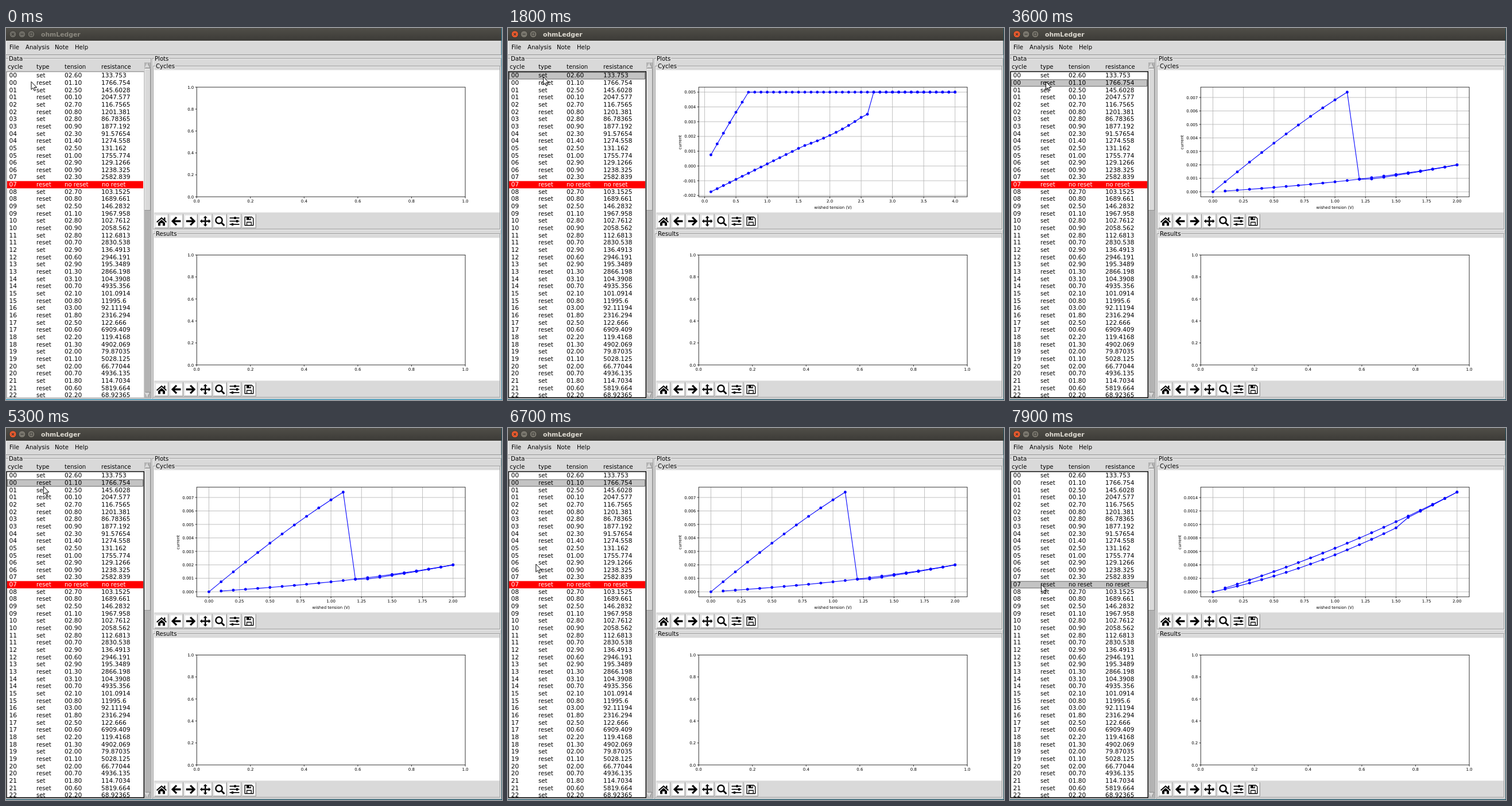
An HTML page with a canvas that plays this animation: 864x648 px, repeating every 8000 ms.

```html
<!DOCTYPE html>
<html lang="en">
<head>
<meta charset="utf-8">
<title>ohmLedger</title>
<style>
html, body { margin: 0; width: 100%; height: 100%; overflow: hidden; background: #d9d9d9; }
canvas { display: block; }
</style>
</head>
<body>
<canvas id="stage" width="864" height="648"></canvas>
<script>
const ctx = document.getElementById('stage').getContext('2d');
const LOOP = 8000, TICK = 100;
const FACE = '"DejaVu Sans", sans-serif';
const GREY = '#d9d9d9';
const ROW_TOP = 76.8, ROW_H = 12.656, BAD_ROW = 15;

// Text of the listing: tension and resistance, set and reset in turn.
const rows = `02.60 133.753,01.10 1766.754,02.50 145.6028,00.10 2047.577,02.70 116.7565,00.80 1201.381,
02.80 86.78365,00.90 1877.192,02.30 91.57654,01.40 1274.558,02.50 131.162,01.00 1755.774,
02.90 129.1266,00.90 1238.325,02.30 2582.839,- -,02.70 103.1525,00.80 1689.661,
02.50 146.2832,01.10 1967.958,02.80 102.7612,00.90 2058.562,02.80 112.6813,00.70 2830.538,
02.90 136.4913,00.60 2946.191,02.90 195.3489,01.30 2866.198,03.10 104.3908,00.70 4935.356,
02.10 101.0914,00.80 11995.6,03.00 92.11194,01.80 2316.294,02.50 122.666,00.60 6909.409,
02.20 119.4168,01.30 4902.069,02.00 79.87035,01.10 5028.125,02.00 66.77044,00.70 4936.135,
01.80 114.7034,00.60 5819.664,02.20 68.92365`.split(',').map(r => r.trim().split(' '));

// Currents as functions of voltage, in units of 1e-5.
const poly = (a, b, c = 0) => v => v * (a + v * (b + v * c));
const sweep = (from, to, current) =>
  Array.from({ length: Math.round((to - from) * 10) + 1 }, (_, i) => {
    const v = from + i / 10;
    return [v, current(v)];
  });

const LIMIT = 500;
const conducting = poly(760, -66);
const insulating = poly(70.1, -14.9, 15.8);
const breaking = v => Math.min(insulating(v), 308 + 210 * (v - 2.4));
const heating = poly(747, -35, -30);
const leaking = poly(58, 11, 5);
const dropped = v => Math.max(93, leaking(v) - 14 * (2 - v));
const failedUp = poly(38.1, 16.8), failedDown = poly(55.4, 9.3);

const setPlot = {
  x: [0.5, 1], y: [100, 3], curves: [
    sweep(0.1, 4, v => Math.min(LIMIT, conducting(v))),
    sweep(0.1, 4, v => v < 2.65 ? breaking(v) : LIMIT)
  ]
};
const resetPlot = {
  x: [0.25, 2], y: [100, 3], curves: [
    sweep(0, 2, v => v < 1.15 ? heating(v) : dropped(v)),
    sweep(0.1, 2, leaking)
  ]
};
const failedPlot = {
  x: [0.25, 2], y: [20, 4], curves: [
    sweep(0, 2, v => v < 1.55 ? failedUp(v) : failedDown(v) - 5 * (2 - v)),
    sweep(0.1, 2, failedDown)
  ]
};
const emptyPlot = { x: [0.2, 1], y: [0.2, 1], curves: [] };

// Pointer tip: time, x, y.
const pointerKeys = [
  [0, 44, 93], [800, 44, 93], [1000, 52, 91], [1100, 52, 91], [1300, 61.5, 84.5],
  [3000, 61.5, 84.5], [3100, 62.5, 93], [5200, 62.5, 93], [5500, 71, 118], [5900, 57.5, 165],
  [6100, 62, 180], [6800, 46.5, 246], [7000, 51.5, 261], [7400, 54.5, 272], [LOOP, 54.5, 272]
];

function pointerAt(t) {
  const i = pointerKeys.findIndex(k => k[0] > t);
  const [t0, x0, y0] = pointerKeys[i - 1], [t1, x1, y1] = pointerKeys[i];
  const u = (t - t0) / (t1 - t0);
  return [x0 + (x1 - x0) * u, y0 + (y1 - y0) * u];
}

function rect(x0, y0, x1, y1, color) {
  ctx.fillStyle = color;
  ctx.fillRect(x0, y0, x1 - x0, y1 - y0);
}

function line(x0, y0, x1, y1, color, width = 1) {
  ctx.strokeStyle = color;
  ctx.lineWidth = width;
  ctx.beginPath();
  ctx.moveTo(x0, y0);
  ctx.lineTo(x1, y1);
  ctx.stroke();
}

function box(x0, y0, x1, y1, color, width = 1) {
  ctx.strokeStyle = color;
  ctx.lineWidth = width;
  ctx.strokeRect(x0, y0, x1 - x0, y1 - y0);
}

function text(s, x, y, { size = 10.125, color = '#000', align = 'left', weight = '' } = {}) {
  ctx.font = `${weight} ${size}px ${FACE}`;
  ctx.textAlign = align;
  ctx.fillStyle = color;
  ctx.fillText(s, x, y);
}

function groove(label, x0, y0, x1, y1, labelX) {
  box(x0 + 1, y0 + 1, x1 + 1, y1 + 1, '#fff', 0.9);
  box(x0, y0, x1, y1, '#8c8c8c', 0.9);
  ctx.font = `10.125px ${FACE}`;
  rect(labelX - 1, y0 - 5, labelX + ctx.measureText(label).width + 1, y0 + 6, GREY);
  text(label, labelX, y0 + 3.6);
}

function raised(x0, y0, x1, y1) {
  rect(x0, y0, x1, y1, '#828282');
  rect(x0, y0, x1 - 0.9, y1 - 0.9, '#fff');
  rect(x0 + 0.9, y0 + 0.9, x1 - 0.9, y1 - 0.9, GREY);
}

function disc(x, y, r, fill, stroke) {
  ctx.beginPath();
  ctx.arc(x, y, r, 0, Math.PI * 2);
  ctx.fillStyle = fill;
  ctx.fill();
  if (!stroke) return;
  ctx.strokeStyle = stroke;
  ctx.lineWidth = 0.8;
  ctx.stroke();
}

function titleBar(active) {
  const shade = ctx.createLinearGradient(0, 0, 0, 22);
  shade.addColorStop(0, '#504e48');
  shade.addColorStop(1, '#3c3b37');
  rect(0, 0, 864, 22.5, shade);
  const ink = '#3a3935';
  [12, 28, 44].forEach((x, i) => {
    const fill = !active ? '#6e6c65' : i ? '#7a776e' : '#ea5a2d';
    disc(x, 10.8, 6, fill, '#35342f');
    if (i === 0) {
      line(x - 2, 8.8, x + 2, 12.8, ink, 1.2);
      line(x - 2, 12.8, x + 2, 8.8, ink, 1.2);
    } else if (i === 1) line(x - 2.5, 10.8, x + 2.5, 10.8, ink, 1.2);
    else box(x - 2.2, 8.6, x + 2.2, 13, ink);
  });
  text('ohmLedger', 61, 14.6, { size: 10.8, weight: 'bold', color: active ? '#dfdbd2' : '#8b887f' });
}

function menuBar() {
  raised(0, 22.5, 863, 47);
  [['File', 6], ['Analysis', 34], ['Note', 85], ['Help', 120]].forEach(([s, x]) => text(s, x, 37.3));
}

function scrollBar() {
  rect(241, 60, 252, 644, '#b3b3b3');
  raised(241.5, 71, 251.5, 318);
  const arrow = (base, tip) => {
    ctx.beginPath();
    ctx.moveTo(242, base);
    ctx.lineTo(246.5, tip);
    ctx.lineTo(251, base);
    ctx.closePath();
    ctx.fillStyle = GREY;
    ctx.fill();
    ctx.strokeStyle = '#858585';
    ctx.lineWidth = 0.9;
    ctx.stroke();
    line(242, base, 246.5, tip, '#fff', 0.9);
  };
  arrow(69.5, 61);
  arrow(634.5, 643);
}

function table(selected, focused) {
  [['cycle', 3], ['type', 53], ['tension', 102], ['resistance', 166]].forEach(([s, x]) => text(s, x, 70.7));
  rect(1, 76, 240, 644, '#fff');
  ctx.save();
  ctx.beginPath();
  ctx.rect(1, 76, 239, 567.5);
  ctx.clip();
  rows.forEach(([tension, resistance], i) => {
    const top = ROW_TOP + i * ROW_H, base = top + 9.5;
    const bad = i === BAD_ROW, picked = i === selected;
    if (bad || picked) rect(1.8, top, 239, top + ROW_H, picked ? '#c3c3c3' : '#f00');
    if (picked) {
      ctx.setLineDash([1, 1]);
      box(2.3, top + 0.5, 238.5, top + ROW_H - 0.5, '#000', 0.9);
      ctx.setLineDash([]);
    }
    const color = bad && !picked ? '#fff' : '#000';
    const digits = { size: 10.6, color };
    text(String(i >> 1).padStart(2, '0'), 5.5, base, digits);
    text(i % 2 ? 'reset' : 'set', 53, base, { color });
    text(bad ? 'no reset' : tension, 102, base, bad ? { color } : digits);
    text(bad ? 'no reset' : resistance, bad ? 167 : 166, base, bad ? { color } : digits);
  });
  ctx.restore();
  if (focused) box(1, 76, 240.3, 643.8, '#000', 1.4);
  else {
    box(1, 76, 240.3, 643.8, '#c8c8c8', 0.8);
    line(0.5, 76, 240.5, 76, '#777', 0.9);
    line(1, 76, 1, 644, '#777', 0.9);
  }
}

const shapes = {
  home: new Path2D('M-9 1L0-7L9 1L7.7 2.4L0-4.3L-7.7 2.4ZM-6 2.7L0-2.6L6 2.7V8H2V3.2H-2V8H-6ZM4-6.5H6.5V-1.5L4-3.7Z'),
  arrow: new Path2D('M-8.5 0L-.5-8L1.8-5.8L-2.4-1.7H8V1.7H-2.4L1.8 5.8L-.5 8Z'),
  chevron: new Path2D('M-1.2-1V-5.7H-3.5L0-9.3L3.5-5.7H1.2V-1Z'),
  disk: new Path2D('M-8-8H5L8-5V8H-8ZM-6.6-6.6V6.6H-4.5V1H4.5V6.6H6.6V-4.4L4.4-6.6H3.5V-2H-4.5V-6.6ZM.5-6.6V-3.4H2.4V-6.6ZM-3.2 2.4V6.6H3.2V2.4Z')
};
const fillShape = name => ctx.fill(shapes[name], 'evenodd');
const icons = [
  () => fillShape('home'),
  () => fillShape('arrow'),
  () => { ctx.scale(-1, 1); fillShape('arrow'); },
  () => {
    ctx.fillRect(-1.2, -1.2, 2.4, 2.4);
    for (let i = 0; i < 4; i++) {
      fillShape('chevron');
      ctx.rotate(Math.PI / 2);
    }
  },
  () => {
    disc(-1.6, -1.6, 5.6, '#fff');
    ctx.lineWidth = 2.4;
    ctx.strokeStyle = '#000';
    ctx.stroke();
    line(2.8, 2.8, 7.8, 7.8, '#000', 3);
  },
  () => [[-5.6, 1], [0, 4.5], [5.6, -3.5]].forEach(([y, knob]) => {
    line(-8.5, y, 8.5, y, '#000', 1.7);
    rect(knob - 1.6, y - 2.1, knob + 1.6, y + 2.1, '#000');
  }),
  () => fillShape('disk')
];

function toolbar(y) {
  icons.forEach((draw, i) => {
    const x = 271 + 25.4 * i;
    raised(x - 12, y - 12.2, x + 12.2, y + 12.2);
    rect(x - 10, y - 10.2, x + 10.2, y + 10.2, '#fff');
    ctx.save();
    ctx.translate(x, y);
    ctx.fillStyle = '#000';
    draw();
    ctx.restore();
  });
}

// Data range widened by five percent on both sides.
function limits(values) {
  if (!values.length) return [0, 1];
  const low = Math.min(...values), high = Math.max(...values), pad = (high - low) / 20;
  return [low - pad, high + pad];
}

function ticks([low, high], step) {
  const list = [];
  for (let k = Math.ceil(low / step); k * step <= high + 1e-9; k++) list.push(k * step);
  return list;
}

function chart({ x: [xStep, xDigits], y: [yStep, yDigits], curves }, top, bottom) {
  const left = 332.2, right = 800, size = 7.03;
  const filled = curves.length > 0;
  const points = curves.flat();
  const xs = limits(points.map(p => p[0])), ys = limits(points.map(p => p[1]));
  const px = v => left + (v - xs[0]) / (xs[1] - xs[0]) * (right - left);
  const py = v => bottom - (v - ys[0]) / (ys[1] - ys[0]) * (bottom - top);
  for (const v of ticks(xs, xStep)) {
    const x = px(v);
    if (filled) line(x, top, x, bottom, '#b0b0b0', 0.8);
    line(x, bottom, x, bottom + 2.6, '#000', 0.8);
    text(v.toFixed(xDigits), x, bottom + 10, { size, align: 'center' });
  }
  for (const v of ticks(ys, yStep)) {
    const y = py(v);
    if (filled) line(left, y, right, y, '#b0b0b0', 0.8);
    line(left - 2.6, y, left, y, '#000', 0.8);
    text((filled ? v * 1e-5 : v).toFixed(yDigits), 327.3, y + 2.6, { size, align: 'right' });
  }
  for (const curve of curves) {
    ctx.beginPath();
    curve.forEach(([v, c]) => ctx.lineTo(px(v), py(c)));
    ctx.strokeStyle = '#00f';
    ctx.lineWidth = 1.1;
    ctx.stroke();
    curve.forEach(([v, c]) => disc(px(v), py(c), 2.45, '#00f'));
  }
  box(left, top, right, bottom, '#000', 0.8);
  if (!filled) return;
  text('wished tension (V)', (left + right) / 2, bottom + 21.2, { size, align: 'center' });
  ctx.save();
  ctx.translate(yDigits === 4 ? 298 : 302, (top + bottom) / 2 + 0.5);
  ctx.rotate(-Math.PI / 2);
  text('current', 0, 0, { size, align: 'center' });
  ctx.restore();
}

function panel(label, frameTop, top, bottom, plot) {
  const height = bottom - top;
  groove(label, 256.5, frameTop, 860.5, bottom + 29, 261);
  rect(258, top, 859.7, bottom, '#fff');
  chart(plot, top + 0.12 * height, bottom - 0.11 * height);
  toolbar(bottom + 15.2);
}

const arrowHead = new Path2D('M.5.5V14.2L3.6 11.3L5.8 16.4L8 15.4L5.8 10.5H10Z');
function pointer(x, y) {
  ctx.save();
  ctx.translate(x - 0.5, y);
  ctx.fillStyle = '#fff';
  ctx.fill(arrowHead);
  ctx.strokeStyle = '#000';
  ctx.lineWidth = 1;
  ctx.stroke(arrowHead);
  ctx.restore();
}

function stateAt(t) {
  if (t < 1800) return [-1, emptyPlot];
  if (t < 3600) return [0, setPlot];
  if (t < 7900) return [1, resetPlot];
  return [BAD_ROW, failedPlot];
}

function draw(t) {
  const active = t >= 1700;
  const [selected, plot] = stateAt(t);
  const desktop = active ? '#174f61' : '#2a8fb5';
  rect(0, 0, 864, 648, GREY);
  titleBar(active);
  menuBar();
  groove('Data', -1, 53, 252.6, 645, 5);
  groove('Plots', 254.5, 53, 862.3, 645, 259);
  scrollBar();
  table(selected, active);
  panel('Cycles', 66.3, 73.3, 321.3, plot);
  panel('Results', 358.3, 365.5, 614.3, emptyPlot);
  rect(0, 646.6, 864, 648, desktop);
  rect(863.2, 0, 864, 648, desktop);
  pointer(...pointerAt(t));
}

const start = performance.now();
let shown = -1;
function frame() {
  const elapsed = Math.max(0, performance.now() - start) % LOOP;
  const t = Math.floor(elapsed / TICK) * TICK;
  if (t !== shown) draw(shown = t);
  requestAnimationFrame(frame);
}
frame();
</script>
</body>
</html>
```
